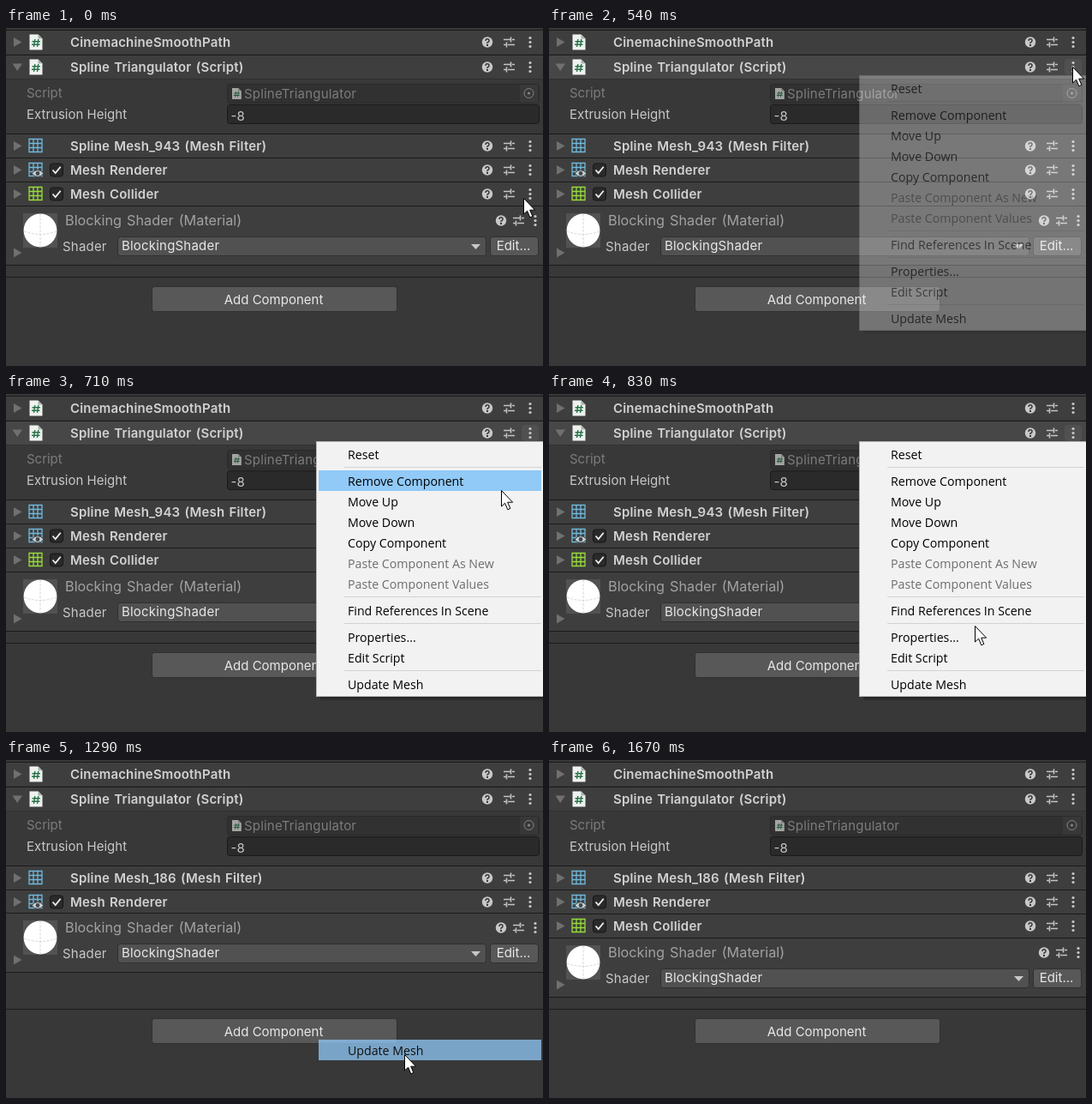
Write an HTML page that moves like this. It is 627 by 394 pixels and loops after 2.18 s.

```html
<!DOCTYPE html>
<html lang="en">
<head>
<meta charset="utf-8">
<title>Inspector: update mesh</title>
<style>
  html, body { margin: 0; width: 100%; height: 100%; overflow: hidden; background: #383838; }
  svg { display: block; width: 627px; height: 394px; }
  text { font: 15px Inter, sans-serif; fill: #c8c8c8; white-space: pre; }
  rect, .crisp { shape-rendering: crispEdges; }
  rect[rx] { shape-rendering: auto; }
  .title { font-weight: 600; fill: #d2d2d2; letter-spacing: .17px; word-spacing: 1.3px; }
  .material { font-size: 16.25px; fill: #a2a2a2; word-spacing: 1.4px; }
  .dim { fill: #7c7c7c; }
  .value { letter-spacing: .2px; }
  .bright { fill: #e8e8e8; }
  .mid { text-anchor: middle; }
  .item { font: 14.2px "Open Sans", sans-serif; fill: #000; }
  .off { fill: #6d6d6d; }
</style>
</head>
<body>
<svg id="stage" viewBox="0 0 627 394">
  <defs>
    <linearGradient id="shade" x2="0" y2="1">
      <stop stop-color="#000" stop-opacity=".4"/>
      <stop offset="1" stop-color="#000" stop-opacity="0"/>
    </linearGradient>
  </defs>
</svg>
<script>
const LOOP = 2180, STEP = 1000 / 24;
const stage = document.getElementById('stage');

const rect = (x, y, w, h, fill, more = '') =>
  `<rect x="${x}" y="${y}" width="${w}" height="${h}" fill="${fill}" ${more}/>`;
const box = (x, y, w, h, fill, line) =>
  rect(x + .5, y + .5, w - 1, h - 1, fill, `rx="3" stroke="${line}"`);
const text = (x, y, s, cls = '', id = '') =>
  `<text x="${x}" y="${y}" class="${cls}" id="${id}">${s}</text>`;
const path = (d, fill, more = '') => `<path d="${d}" fill="${fill}" ${more}/>`;
const stroke = (d, color, width = 1, more = '') =>
  path(d, 'none', `stroke="${color}" stroke-width="${width}" ${more}`);
const group = (id, body, more = '') => `<g id="${id}" ${more}>${body}</g>`;
const rule = (y, color = '#1a1a1a') => rect(0, y, 627, 1, color);

const foldClosed = y => path(`M9 ${y - 5.5}L18.5 ${y}L9 ${y + 5.5}Z`, '#707070');
const foldOpen = y => path(`M7.5 ${y - 4}H19L13.2 ${y + 4.5}Z`, '#707070');

const tools = (y, help = 562, preset = 587, dots = 612) =>
  `<circle cx="${help}" cy="${y}" r="6.2" fill="#c8c8c8"/>` +
  stroke(`M${help - 2} ${y - 1.6}q0 -2.2 2 -2.2t2 2q0 1.2 -1.2 1.8t-.8 1.6`, '#383838', 1.5) +
  rect(help - 1, y + 2.5, 2, 2, '#383838') +
  stroke(`M${preset - 6} ${y - 3}h8m2 0h3M${preset + 2.5} ${y - 6}v6` +
         `M${preset - 6} ${y + 3}h3m2 0h8M${preset - 2.5} ${y}v6`, '#c4c4c4', 1.6) +
  [-5, 0, 5].map(d => `<circle cx="${dots}" cy="${y + d}" r="1.6" fill="#c8c8c8"/>`).join('');

const page = (x, y, s, alpha = 1) =>
  `<g transform="translate(${x} ${y}) scale(${s})" opacity="${alpha}">` +
  path('M0 0H10L15 5V18H0Z', '#eef2ee') + path('M10 0V5H15Z', '#a9b3ab') +
  stroke('M6.3 5.5L5 14.5M10.3 5.5L9 14.5M3 8.3H12.4M2.5 11.7H12', '#28704a', 1.4) + '</g>';

const grid = (y, color) =>
  stroke(`M27 ${y - 8}h15v15h-15zM32 ${y - 8}v15M37 ${y - 8}v15M27 ${y - 3}h15M27 ${y + 2}h15`,
         color, 1.3);
const eye = y =>
  path(`M30 ${y + 4}q7 -8 14 0q-7 8 -14 0z`, '#c8d0d4', 'stroke="#3e3e3e"') +
  `<circle cx="37" cy="${y + 4}" r="2.4" fill="#3e4a50"/>`;
const check = y => box(51, y - 8, 16, 16, '#2a2a2a', '#161616') +
  stroke(`M54.5 ${y}l3.2 3.6l6 -7.4`, '#eee', 1.8);

const header = (y, label, icon, fold = foldClosed, id = '') =>
  rect(0, y - 13.5, 627, 27, '#3e3e3e') + rule(y - 14.5) + fold(y) + icon +
  text(75, y + 5.5, label, 'title', id);

const material =
  rect(0, 208, 627, 68, '#3e3e3e') + rule(207) + rule(276) +
  rect(20, 216, 40, 40, '#525252') +
  '<circle cx="40" cy="236" r="19.4" fill="#fff"/>' +
  stroke('M40 217V255M21 237Q40 244 59 237', '#ccc', .8, 'stroke-dasharray="3 1.5"') +
  foldClosed(262) + text(69, 230, 'Blocking Shader (Material)', 'material') +
  tools(224.5, 578, 598, 618) + text(66, 260, 'Shader', 'value') +
  box(130, 243, 431, 23, '#515151', '#303030') + text(135, 259, 'BlockingShader', 'value bright') +
  path('M543 252H554L548.5 258Z', '#c8c8c8') +
  box(565, 243, 57, 23, '#585858', '#303030') + text(592.5, 259, 'Edit...', 'bright mid');

const inspector =
  rect(0, 0, 627, 394, '#383838') +
  header(16.5, 'CinemachineSmoothPath', page(27.5, 7.5, 1)) +
  rect(0, 32, 627, 27, '#3e3e3e') +
  group('hover', rect(0, 32, 627, 27, '#474747') + box(602, 36, 20, 19, '#505050', '#505050')) +
  rule(31) + foldOpen(45.5) + page(27.5, 36.5, 1) +
  text(75, 51, 'Spline Triangulator (Script)', 'title') + rule(59, '#303030') +
  tools(16.5) + tools(45.5) +
  text(24, 81, 'Script', 'dim') +
  box(258, 65, 365, 23, '#313131', '#2a2a2a') +
  rect(600, 66, 21, 21, '#383838') + page(264, 70, .72, .6) +
  text(278, 82, 'SplineTriangulator', 'value dim') +
  '<circle cx="610.5" cy="76" r="5.5" fill="none" stroke="#858585"/>' +
  '<circle cx="610.5" cy="76" r="1.6" fill="#858585"/>' +
  text(24, 106, 'Extrusion Height') +
  box(258, 89, 365, 23, '#2a2a2a', '#191919') + text(262.5, 108, '-8') +
  header(137.5, '', grid(137.5, '#6fb9dc'), foldClosed, 'meshName') + tools(137.5) +
  header(165.5, 'Mesh Renderer', grid(165.5, '#6fb9dc') + eye(165.5) + check(165.5)) + tools(165.5) +
  group('collider',
    header(193.5, 'Mesh Collider', grid(193.5, '#98dc3c') + check(193.5)) + tools(193.5)) +
  group('material', material) + rule(290) +
  box(170, 301, 287, 30, '#585858', '#303030') + text(312.5, 322, 'Add Component', 'bright mid');

const items = [
  [71, 'Reset'], [102, 'Remove Component'], [126, 'Move Up'], [150, 'Move Down'],
  [174, 'Copy Component'], [198, 'Paste Component As New', 'off'],
  [222, 'Paste Component Values', 'off'], [253, 'Find References In Scene'],
  [284, 'Properties...'], [308, 'Edit Script'], [339, 'Update Mesh']
];
const menu =
  rect(367, 353, 260, 5, 'url(#shade)') +
  rect(362, 55, 265, 298, '#b4b4b4') + rect(363, 56, 264, 296, '#f2f2f2') +
  [85, 236, 267, 322].map(y => rect(395, y, 230, 1, '#d2d2d2')).join('') +
  rect(365, 0, 260, 24, '#91c9f7', 'id="highlight"') +
  items.map(([y, s, cls = '']) => text(399, y + 5, s, 'item ' + cls)).join('');

const picked = rect(365, 326, 260, 24, '#91c9f7') + text(399, 344, 'Update Mesh', 'item');
const arrow = path('M.5 .5V19L4.6 15.2L7.8 22.8L10.8 21.4L7.7 14.2H13.6Z', '#fff', 'stroke="#000"');

stage.insertAdjacentHTML('beforeend', inspector + group('menu', menu) +
  group('picked', picked) + group('cursor', arrow));

const part = Object.fromEntries([...stage.querySelectorAll('[id]')].map(e => [e.id, e]));
const show = (el, on) => el.style.display = on ? '' : 'none';
const clamp = v => Math.max(0, Math.min(1, v));

// Pointer path: tick, x, y
const route = [
  [0, 604, 198], [1, 604, 190], [4, 608, 115], [7, 611, 50], [8, 611, 45], [15, 611, 45],
  [16, 601, 66], [17, 578, 112], [18, 550, 172], [19, 522, 226], [20, 497, 270],
  [21, 484, 298], [23, 469, 328], [25, 465, 337], [26, 465, 343], [33, 465, 343], [40, 452, 400]
];
function pointer(tick) {
  const i = route.findIndex(p => p[0] > tick);
  if (i < 0) return [452, 400];
  const [a, ax, ay] = route[i - 1], [b, bx, by] = route[i];
  const k = (tick - a) / (b - a);
  return [ax + (bx - ax) * k, ay + (by - ay) * k].map(Math.round);
}

function draw(ms) {
  const tick = Math.floor((ms + 5) / STEP);
  const [x, y] = pointer(tick);
  const open = tick >= 13 && tick < 31;
  const rebuilding = tick >= 31 && tick < 33;
  const hit = items.find(([cy, , cls]) => !cls && Math.abs(y - cy) < 12);

  part.cursor.setAttribute('transform', `translate(${x} ${y})`);
  show(part.hover, tick >= 7 && tick < 31);
  show(part.menu, open);
  part.menu.setAttribute('opacity', clamp(.32 + (tick - 13) * .24));
  show(part.highlight, hit);
  if (hit) part.highlight.setAttribute('y', hit[0] - 13);
  show(part.picked, tick >= 31 && tick < 40);
  part.picked.setAttribute('opacity', clamp((40 - tick) / 12));
  show(part.collider, !rebuilding);
  part.material.setAttribute('transform', `translate(0 ${rebuilding ? -29 : 0})`);
  part.meshName.textContent = `Spline Mesh_${tick < 31 ? 943 : 186} (Mesh Filter)`;
}

function loop() {
  draw(performance.now() % LOOP);
  requestAnimationFrame(loop);
}
loop();
</script>
</body>
</html>
```
